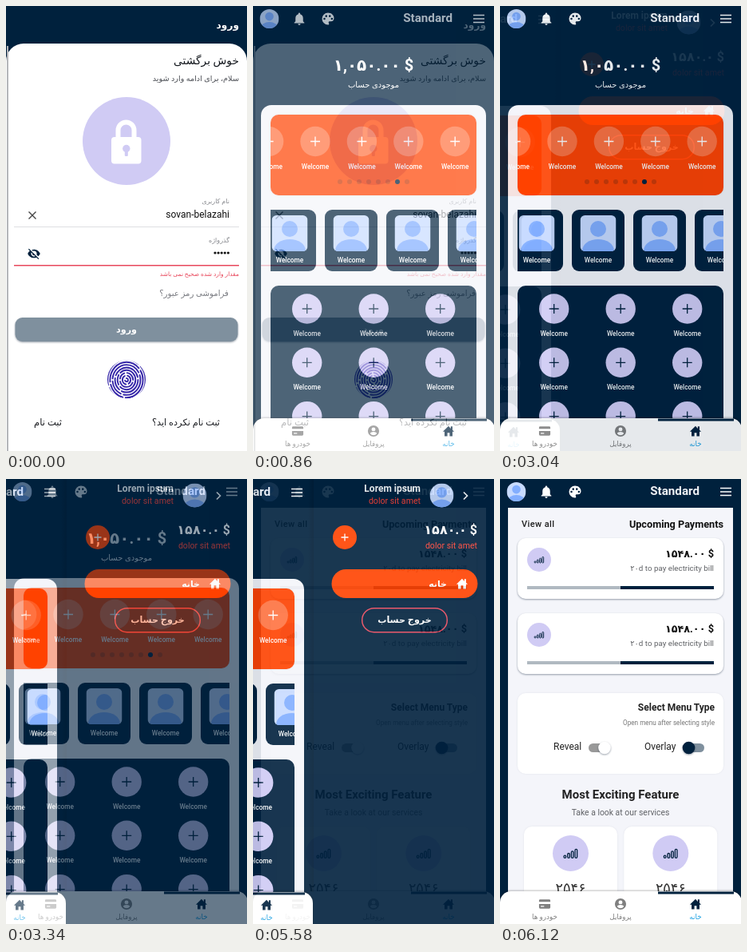
Recreate the animation shown at these times as an HTML page. Size 302 by 557 pixels, loop 8000 ms.

```html
<!DOCTYPE html>
<html lang="fa">
<head>
<meta charset="utf-8">
<title>App screens</title>
<style>
  html, body { margin: 0; width: 100%; height: 100%; overflow: hidden; background: #00213d; }
  #stage { position: relative; width: 302px; height: 557px; overflow: hidden; }
  .screen { position: absolute; left: 0; top: 0; width: 302px; height: 557px; }
  text { font-family: Roboto, "DejaVu Sans", sans-serif; white-space: pre; }
  .card { filter: drop-shadow(0 1px 1px rgba(0, 20, 45, .4)); }
  .soft { filter: drop-shadow(0 0 1px rgba(0, 20, 45, .08)); }
  #home { animation: home 8s infinite; }
  #menu { animation: menu 8s infinite; }
  #feed { animation: feed 8s infinite; }
  /* each fade: ten 60 ms steps, the first one immediate */
  @keyframes home {
    0% { opacity: 0; }
    6.25% { opacity: 0; animation-timing-function: steps(10, jump-start); }
    13.75%, 100% { opacity: 1; }
  }
  @keyframes menu {
    0% { opacity: 0; }
    38% { opacity: 0; animation-timing-function: steps(10, jump-start); }
    45.5%, 100% { opacity: 1; }
  }
  @keyframes feed {
    0% { opacity: 0; }
    69.75% { opacity: 0; animation-timing-function: steps(10, jump-start); }
    77.25%, 100% { opacity: 1; }
  }
</style>
</head>
<body>
<svg width="0" height="0" style="position:absolute">
  <defs>
    <clipPath id="square"><rect width="45" height="45" rx="6"/></clipPath>
    <clipPath id="round"><circle cx="22.5" cy="22.5" r="22.5"/></clipPath>
    <clipPath id="banner"><rect x="22" y="136" width="258" height="101" rx="10"/></clipPath>
    <clipPath id="strip"><rect x="22" y="250" width="258" height="90"/></clipPath>
    <clipPath id="print"><circle cx="151" cy="467.5" r="24"/></clipPath>
    <linearGradient id="edge"><stop stop-color="#001022" stop-opacity="0"/><stop offset="1" stop-color="#001022" stop-opacity=".3"/></linearGradient>
  </defs>
</svg>
<div id="stage">
  <svg class="screen" id="login"></svg>
  <svg class="screen" id="home"></svg>
  <svg class="screen" id="menu"></svg>
  <svg class="screen" id="feed"></svg>
</div>
<script>
const NAVY = '#00213d', ORANGE = '#ff4200', LILAC = '#d0cbf4', PAPER = '#f4f5fa', RED = '#ff4336', ROSE = '#e8485c';

const ICONS = {
  home: 'M10 21v-6h4v6h5v-8h3l-3-2.7V4h-3v3.6L12 3 2 13h3v8z',
  bell: 'M12 22a2 2 0 0 0 2-2h-4a2 2 0 0 0 2 2zm6-6v-5c0-3.07-1.64-5.64-4.5-6.32V4a1.5 1.5 0 0 0-3 0v.68C7.63 5.36 6 7.92 6 11v5l-2 2v1h16v-1z',
  palette: 'M12 2a10 10 0 0 0 0 20c1 0 1.7-.7 1.7-1.7 0-.4-.2-.8-.4-1.1-.3-.3-.4-.7-.4-1.1 0-.9.7-1.7 1.7-1.7H17c3 0 5-2.5 5-5.5C22 5.9 17.500 2 12 2z'
    + [[6, 12], [9, 7.5], [15, 7.5], [18.5, 12]].map(([x, y]) => `M${x - 1.7} ${y}a1.700 1.700 0 1 0 3.400 0a1.700 1.700 0 1 0 -3.400 0z`).join(''),
  user: 'M12 2a10 10 0 1 0 0 20a10 10 0 0 0 0-20zm0 3.500a3.500 3.500 0 1 1 0 7a3.500 3.500 0 0 1 0-7zm0 14a7.200 7.200 0 0 1-6-3.200c0-2 4-3 6-3s6 1 6 3a7.200 7.200 0 0 1-6 3.200z',
  pay: 'M20 4H4a2 2 0 0 0-2 2v12a2 2 0 0 0 2 2h16a2 2 0 0 0 2-2V6a2 2 0 0 0-2-2zM2 8h20v4H2zm3 7h6v2H5z',
  eyeOff: 'M12 7a5 5 0 0 1 5 5c0 .65-.13 1.26-.36 1.83l2.92 2.92A11.8 11.8 0 0 0 23 12c-1.73-4.39-6-7.500-11-7.500-1.400 0-2.740.25-3.980.7l2.160 2.160C10.740 7.130 11.350 7 12 7zM2 4.270l2.740 2.740A11.800 11.800 0 0 0 1 12c1.730 4.390 6 7.500 11 7.500 1.550 0 3.030-.3 4.380-.84l.42.42L19.730 22 21 20.730 3.270 3zM7.530 9.800l1.550 1.550c-.05.21-.08.43-.08.65a3 3 0 0 0 3 3c.22 0 .44-.03.65-.08l1.550 1.550A5 5 0 0 1 7 12c0-.79.2-1.530.53-2.200z'
};

const repeat = (n, draw) => Array.from({ length: n }, (_, i) => draw(i)).join('');
const rect = (x, y, w, h, r, fill, more = '') =>
  `<rect x="${x}" y="${y}" width="${w}" height="${h}" rx="${r}" fill="${fill}" ${more}/>`;
const disc = (x, y, r, fill, more = '') => `<circle cx="${x}" cy="${y}" r="${r}" fill="${fill}" ${more}/>`;
const line = (d, color, w = 1.3, more = '') => `<path d="${d}" fill="none" stroke="${color}" stroke-width="${w}" ${more}/>`;
const text = (s, x, y, size, fill, anchor = 'end', weight = 400, more = '') =>
  `<text x="${x}" y="${y}" font-size="${size}" fill="${fill}" text-anchor="${anchor}" font-weight="${weight}" ${more}>${s}</text>`;
const icon = (name, x, y, size, fill) =>
  `<path d="${ICONS[name]}" fill="${fill}" fill-rule="evenodd" transform="translate(${x - size / 2} ${y - size / 2}) scale(${size / 24})"/>`;
const plus = (x, y, color, a = 6) => line(`M${x - a} ${y}h${2 * a}M${x} ${y - a}v${2 * a}`, color);
const avatar = (x, y, size, clip) =>
  `<g transform="translate(${x - size / 2} ${y - size / 2}) scale(${size / 45})"><g clip-path="url(#${clip})">`
  + rect(0, 0, 45, 45, 0, '#c8dbff') + disc(22.5, 17, 10, '#82aeff')
  + '<ellipse cx="22.500" cy="44" rx="20" ry="14" fill="#82aeff"/></g></g>';
const bars = (x, y, s) => `<g transform="translate(${x} ${y}) scale(${s})">`
  + repeat(4, i => rect(-6.5 + i * 3.6, 2 - i * 2, 2, 2.5 + i * 2, 1, 'none', `stroke="${NAVY}" stroke-width="1"`)) + '</g>';
const welcome = (x, y) => text('Welcome', x, y, 8.3, '#fff', 'middle', 500);

function header() {
  return avatar(20.5, 16, 24, 'round') + icon('bell', 58, 16, 19, '#fff') + icon('palette', 94, 16, 18, '#fff')
    + text('Standard', 250, 20, 15.2, '#eef1f5', 'end', 700)
    + line('M276 11.500h14M276 16h14M276 20.500h14', '#fff', 1.6);
}

function tabs() {
  const tab = (name, label, x, tint, ink) => icon(name, x, 532, 17, tint) + text(label, x, 551, 8.8, ink, 'middle');
  return '<path d="M0 570V530a14 14 0 0 1 14-14H289a14 14 0 0 1 14 14V570z" fill="#fff" style="filter:drop-shadow(0 -1px 1px rgba(0,0,0,.25))"/>'
    + rect(198, 516.5, 95, 3, 0, NAVY)
    + tab('pay', 'خودرو ها', 56, '#808080', '#808080')
    + tab('user', 'پروفایل', 151, '#808080', '#808080')
    + tab('home', 'خانه', 245, NAVY, '#1ba0e2');
}

function fingerprint() {
  const ridge = i => {
    const r = 2 + i * 3.1;
    return `<ellipse cx="151" cy="468" rx="${r}" ry="${r * 1.08}" fill="none" stroke="#3526a8" stroke-width="1.900" stroke-linecap="round"`
      + ` stroke-dasharray="${r * 2.6} 3.500 ${r * 1.1} 3.500" stroke-dashoffset="${i * 17}"/>`;
  };
  return `<g clip-path="url(#print)">${repeat(8, ridge)}</g>`;
}

function loginScreen() {
  return rect(0, 0, 302, 557, 0, NAVY)
    + '<path d="M0 557V69a22 22 0 0 1 22-22H280a22 22 0 0 1 22 22V557z" fill="#fff"/>'
    + rect(1, 50, 2, 507, 0, '#b4b5b9')
    + text('ورود', 292, 28, 12.2, '#fff', 'end', 700)
    + text('خوش برگشتی', 292, 73, 13.8, '#15191f')
    + text('سلام، برای ادامه وارد شوید', 292, 94, 9.7, '#4c4f55')
    + disc(151, 169, 55, LILAC)
    + line('M140.500 167v-11.500a10 10 0 0 1 20 0v11.500', '#fff', 6)
    + rect(132, 164, 37.5, 33.5, 4, '#fff')
    + disc(150.8, 178.5, 4.7, LILAC) + rect(148.8, 180, 4, 8, 1, LILAC)
    + text('نام کاربری', 280, 247, 8, '#85878c')
    + text('sovan-belazahi', 280, 265, 12, '#111')
    + line('M28.500 257.500l9 9M37.500 257.500l-9 9', '#444', 1.4)
    + rect(10, 276, 282, 1, 0, '#dedfe2')
    + text('گذرواژه', 280, 296, 8, '#85878c')
    + repeat(5, i => disc(262 + i * 4.1, 309, 1.6, '#111'))
    + icon('eyeOff', 35, 310, 17, NAVY)
    + rect(10, 324, 282, 1.5, 0, ROSE)
    + text('مقدار وارد شده صحیح نمی باشد', 292, 338, 7.5, ROSE)
    + text('فراموشی رمز عبور؟', 279, 363, 10.2, '#77797f')
    + rect(11.5, 390, 279, 30, 9, '#7f909e', 'class="card"')
    + text('ورود', 151, 409, 11.2, '#fff', 'middle', 700)
    + fingerprint()
    + text('ثبت نام نکرده اید؟', 268, 525, 11.4, '#1b1d22')
    + text('ثبت نام', 70, 525, 11.6, '#1b1d22');
}

function homeScreen() {
  const slot = i => {
    const x = 19.6 + i * 58.4;
    return disc(x, 169.5, 18.7, '#ff7240') + plus(x, 169.5, '#fff') + welcome(x, 204);
  };
  const person = i => {
    const x = 46 + i * 77;
    return rect(x - 33, 255, 66, 77, 9, NAVY) + avatar(x, 284.5, 45, 'square') + welcome(x, 321);
  };
  const cell = i => {
    const x = 67.7 + (i % 3) * 83.5, y = 379 + Math.floor(i / 3) * 67.3;
    return disc(x, y, 18.7, LILAC) + plus(x, y, NAVY) + welcome(x, y + 34);
  };
  return rect(0, -2, 302, 580, 0, NAVY) + header()
    + text('۱,۰۵۰.۰۰ $', 151, 81, 20, '#fff', 'middle', 700)
    + text('موجودی حساب', 151, 102, 10, '#fff', 'middle')
    + rect(10, 124, 282, 460, 13, PAPER)
    + rect(22, 136, 258, 101, 10, ORANGE, 'class="soft"')
    + `<g clip-path="url(#banner)">${repeat(5, slot)}</g>`
    + repeat(8, i => disc(109 + i * 12, 220, 3, i === 6 ? NAVY : '#cf3905'))
    + `<g clip-path="url(#strip)">${repeat(4, person)}</g>`
    + rect(22, 350, 258, 240, 10, NAVY) + repeat(9, cell)
    + tabs();
}

function menuScreen() {
  return rect(0, 0, 302, 557, 0, NAVY)
    + `<g transform="translate(-228 1)">${homeScreen()}</g>`
    + rect(69, 0, 7, 517, 0, 'url(#edge)')
    + text('Lorem ipsum', 210, 16, 12, '#fff', 'end', 700)
    + text('dolor sit amet', 210, 31, 10.6, RED)
    + avatar(236.5, 20.5, 30, 'round')
    + line('M264 16.500l4.500 4.500l-4.500 4.500', '#fff', 1.7)
    + text('۱۵۸۰.۰ $', 281, 69, 16, '#fff', 'end', 700)
    + text('dolor sit amet', 281, 87, 10.6, RED)
    + disc(115, 73, 15, ORANGE) + plus(115, 73, '#fff', 4.5)
    + rect(98.500, 113, 183, 36, 18, ORANGE)
    + text('خانه', 243, 135, 11, '#fff', 'end', 700) + icon('home', 262, 131, 17, '#fff')
    + rect(136.7, 161.7, 106.6, 30, 15, 'none', `stroke="${ROSE}" stroke-width="1.500"`)
    + text('خروج حساب', 190, 180, 11.2, '#fff', 'middle', 700);
}

function feedScreen() {
  const payment = i => `<g transform="translate(0 ${i * 94})">`
    + rect(22, 74, 258, 76, 10, '#fff', 'class="card"')
    + disc(49, 101, 15, LILAC) + bars(49, 101, 0.9)
    + text('۱۵۴۸.۰۰ $', 268, 98, 12.8, '#111', 'end', 700)
    + text('۲۰d to pay electricity bill', 268, 115, 9.8, '#606266')
    + rect(34, 134, 117, 4, 0, '#b0b9c1') + rect(151, 134, 117, 4, 0, NAVY) + '</g>';
  const feature = i => {
    const x = 88.5 + i * 125.3;
    return rect(x - 58.5, 435, 117, 140, 10, '#fff', 'class="soft"')
      + disc(x, 468.5, 22.5, LILAC) + bars(x, 468.5, 1.3)
      + text('۲۵۴۶', x, 518, 17.6, '#333', 'middle');
  };
  return rect(0, 0, 302, 557, 0, NAVY) + header()
    + rect(10, 36, 282, 530, 0, PAPER)
    + text('View all', 27, 60, 11, '#222', 'start', 500, 'letter-spacing=".4"')
    + text('Upcoming Payments', 280, 61, 12.7, '#111', 'end', 700)
    + repeat(2, payment)
    + rect(22, 268, 258, 101, 10, '#fff', 'class="soft"')
    + text('Select Menu Type', 269, 290, 12, '#222', 'end', 700)
    + text('Open menu after selecting style', 269, 308, 8.2, '#777')
    + text('Reveal', 67, 339, 12, '#222', 'start') + text('Overlay', 181, 339, 12, '#222', 'start')
    + rect(111, 331, 26, 11, 5.5, '#999') + disc(131, 336.5, 7.8, '#fff', 'class="card"')
    + rect(230, 331, 26, 11, 5.5, '#7f909e') + disc(236.5, 336.5, 7.8, NAVY, 'class="card"')
    + text('Most Exciting Feature', 151, 400, 15, '#222', 'middle', 700)
    + text('Take a look at our services', 151, 421, 10.4, '#606266', 'middle')
    + repeat(2, feature)
    + tabs();
}

const screens = { login: loginScreen, home: homeScreen, menu: menuScreen, feed: feedScreen };
for (const id in screens) document.getElementById(id).innerHTML = screens[id]();
</script>
</body>
</html>
```
